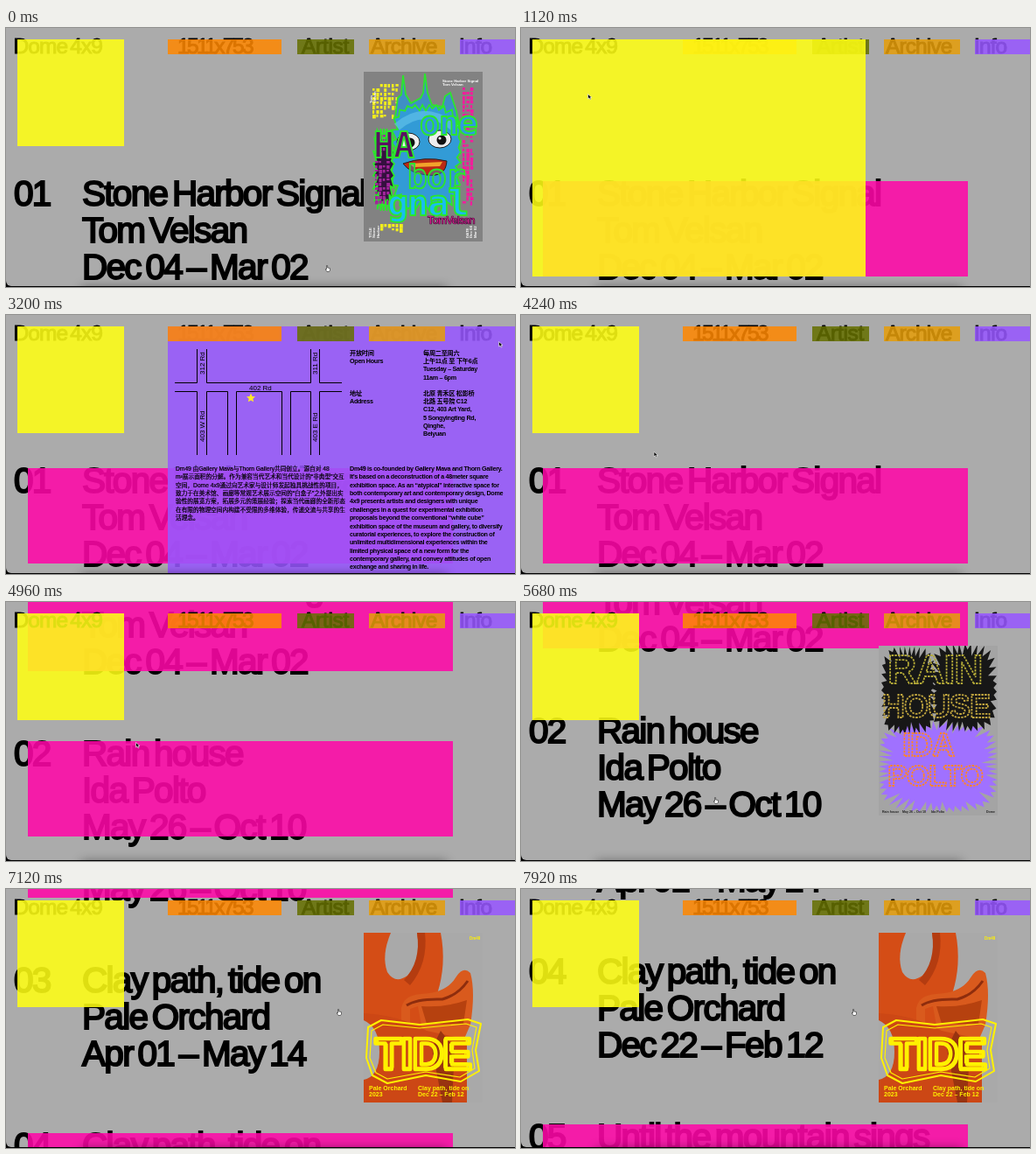
An HTML page that plays this animation: 582x296 px, repeating every 8 s.

```html
<!DOCTYPE html>
<html lang="en">
<head>
<meta charset="utf-8">
<title>Dome 4x9</title>
<style>
html, body { margin: 0; width: 100%; height: 100%; overflow: hidden; }
body { background: #ababab; color: #000; font-family: "Liberation Sans", Arial, sans-serif; }
#stage { position: relative; width: 582px; height: 296px; overflow: hidden; background: #ababab; }
#stage div, #stage svg { position: absolute; white-space: pre; }
#list { left: 0; top: 0; }
.row { left: 0; font-size: 40.5px; line-height: 42px; letter-spacing: -1.7px; word-spacing: -4px; -webkit-text-stroke: 2px #000; }
.pink { left: 25px; width: 486px; height: 109px; background: rgba(255,8,168,.87); }
.nav { top: 8.5px; font-size: 24.5px; line-height: 24px; letter-spacing: -.9px; word-spacing: -3px; -webkit-text-stroke: 1.1px #000; }
.tab { top: 13px; height: 17px; }
#room { left: 13px; top: 13px; background: rgba(255,255,20,.87); }
#info { right: 0; top: 13px; overflow: hidden; background: rgba(152,88,255,.87); }
#about { right: 0; top: 0; width: 397px; height: 283px; }
.copy { font: bold 7.2px/9.36px "Liberation Sans", Arial, "Noto Sans CJK SC", "Noto Sans CJK", sans-serif; letter-spacing: -.3px; }
.zh { font: 500 6.7px/9.36px "Liberation Sans", "Noto Sans CJK SC", "Noto Sans CJK", sans-serif; letter-spacing: 0; -webkit-text-stroke: .2px #000; }
.poster { left: 409px; top: 50px; overflow: hidden; }
#shade { left: 90px; top: 300px; width: 410px; height: 4px; box-shadow: 0 0 12px 4px rgba(0,0,0,.4); }
#edge { left: 0; top: -9px; width: 600px; height: 303.5px; border-radius: 0 0 0 6px; box-shadow: 0 0 0 9px #000; }
</style>
</head>
<body>
<div id="stage"></div>
<script>
const LOOP = 8000, PITCH = 189;
const stage = document.getElementById('stage');

const rows = [
  'Stone Harbor Signal\nTom Velsan\nDec 04 – Mar 02',
  'Rain house\nIda Polto\nMay 26 – Oct 10',
  'Clay path, tide on\nPale Orchard\nApr 01 – May 14',
  'Clay path, tide on\nPale Orchard\nDec 22 – Feb 12',
  'Until the mountain sings\nPale Orchard\nSep 10 – Nov 20'
];
const navs = [[8.5, 'Dome 4x9'], [196, '1511x753', -2.6], [338, 'Artist', -.3], [417, 'Archive'], [518, 'Info']];
const tabs = [[185, 130, 'rgba(255,136,0,.86)'], [333, 65, 'rgba(102,112,0,.86)'], [415, 87, 'rgba(230,158,10,.86)']];

// Motion: [time, values...]
const scrollKeys = [[4480, 0], [4960, 205], [5560, 205], [6180, 463], [7150, 463], [7760, 662]];
const mouseKeys = [[60, 367, 273], [620, 110, 115], [1120, 78, 77], [1300, 90, 90], [1640, 330, 288],
  [1840, 392, 240], [2240, 408, 22], [2420, 420, 24], [2760, 540, 22], [3200, 565, 32], [3480, 560, 40],
  [4000, 160, 150], [4400, 150, 162], [5120, 150, 162], [5500, 222, 225], [6280, 222, 225], [6640, 380, 139]];
// Hovered rows: [row, from, to, poster]
const hovers = [[0, -500, 200, 0], [0, 1660, 2000, 0], [1, 5100, 6200, 1], [2, 6460, 7780, 2], [3, 7780, 9000, 2]];

const clamp = v => Math.max(0, Math.min(1, v));
const ease = u => u * u * (3 - 2 * u);
const span = (t, a, b, d) => Math.min(clamp((t - a) / d), clamp(1 - (t - b) / d));

function at(keys, t) {
  const i = keys.findIndex(k => k[0] > t);
  if (i === 0) return keys[0].slice(1);
  if (i < 0) return keys[keys.length - 1].slice(1);
  const a = keys[i - 1], b = keys[i], u = ease((t - a[0]) / (b[0] - a[0]));
  return a.slice(1).map((v, n) => v + (b[n + 1] - v) * u);
}

let seed = 7;
const rnd = () => (seed = seed * 16807 % 2147483647) / 2147483647;

// Boxy blob with ragged spikes
function burst(cx, cy, rx, ry, n, depth) {
  const pts = [];
  for (let i = 0; i < n; i++) {
    const a = i / n * Math.PI * 2, c = Math.cos(a), s = Math.sin(a);
    const r = (i % 2 ? 1 : 1 - depth * (.4 + rnd())) / Math.pow(c ** 4 + s ** 4, .25);
    pts.push((cx + rx * c * r).toFixed(1) + ',' + (cy + ry * s * r).toFixed(1));
  }
  return pts.join(' ');
}

// Broken columns of small bars
function bars(x, y, cols, lines, color) {
  let out = '';
  for (let c = 0; c < cols; c++) for (let l = 0; l < lines; l++)
    if (rnd() > .2) out += `<rect x="${x + c * 4.4}" y="${y + l * 5}" width="${2 + rnd() * 2}" height="${2 + rnd() * 3}" fill="${color}"/>`;
  return out;
}

const tiny = (x, y, s, fill = '#fff', size = 4.6, more = '') =>
  s.split('\n').map((l, i) => `<text x="${x}" y="${y + i * size}" font-size="${size}" font-weight="bold" fill="${fill}" ${more}>${l}</text>`).join('');
const big = (x, y, s, size, attrs) =>
  `<text x="${x}" y="${y}" font-size="${size}" font-weight="bold" letter-spacing="-1" ${attrs}>${s}</text>`;
const eye = (x, y) => `<ellipse cx="${x}" cy="${y}" rx="13" ry="10" fill="#eee" stroke="#222"/>
  <circle cx="${x + 2}" cy="${y + 1}" r="5.5" fill="#111"/><circle cx="${x}" cy="${y - 1}" r="1.6" fill="#fff"/>`;

function harborArt() {
  const green = 'stroke="#2ce62c" stroke-width="1.8"';
  const block = 'font-family="DejaVu Sans Mono, monospace" ' + green;
  return `<rect width="136" height="194" fill="#828282"/>
    ${bars(10, 14, 7, 8, '#f2ee1c')}${bars(113, 18, 3, 27, '#f41c9c')}
    <polygon points="36,52 39,30 43,26 45,4 48,26 54,36 65,30 68,24 70,2 73,24 78,38 90,40 93,28 99,24 106,45 110,66" fill="#3f8fc4" ${green}/>
    <polygon points="${burst(71, 98, 40, 60, 64, .12)}" fill="#329bd6" ${green}/>
    <polygon points="${burst(23, 112, 12, 47, 44, .3)}" fill="#35103f" ${green}/>
    ${bars(13, 72, 4, 16, '#a3259c')}
    <path d="M38 63Q70 35 105 65" fill="none" stroke="#67c7ed" stroke-width="9" opacity=".6"/>
    ${eye(51, 80)}${eye(87, 77)}
    <path d="M45 105Q70 96 95 102Q94 121 72 118Q53 116 45 105Z" fill="#b92a16" stroke="#222"/>
    <path d="M52 105L90 103L87 108L57 109Z" fill="#f2a32b"/>
    ${big(64, 72, 'one', 38, 'fill="#2f9ade" ' + block)}
    ${big(11, 98, 'HA', 40, 'fill="#5b1262" ' + block)}
    ${big(50, 133, 'bor', 38, 'fill="#318fcb" fill-opacity=".45" ' + block)}
    ${big(27, 164, 'gnal', 40, 'fill="#19bdf0" ' + block)}
    ${big(73, 174, 'TomVelsan', 12, 'fill="#f41c9c" stroke="#43113a" stroke-width=".7"')}
    ${bars(19, 174, 6, 2, '#f2ee1c')}
    ${tiny(90, 12, 'Stone Harbor Signal\nTom Velsan', '#fff', 4.3)}
    ${tiny(9, 190, 'TITLE\nStone\nHarbor', '#fff', 4.3, 'transform="rotate(-90 9 190)"')}
    ${tiny(120, 190, 'DATE\nDec 04\nMar 02', '#fff', 4.3, 'transform="rotate(-90 120 190)"')}
    ${tiny(10, 36, 'Tom\nVelsan', '#fff', 4.3, 'transform="rotate(-90 10 36)"')}`;
}

function rainArt() {
  const line = c => `fill="none" stroke="${c}" stroke-width="1.8" stroke-dasharray="2.5 1.2"`;
  return `<rect width="136" height="194" fill="#a4a4a4"/>
    <polygon points="${burst(68, 138, 68, 52, 110, .2)}" fill="#a071ff"/>
    <polygon points="${burst(34, 51, 31, 50, 70, .2)}" fill="#171717"/>
    <polygon points="${burst(97, 48, 38, 50, 70, .2)}" fill="#171717"/>
    ${big(10, 43, 'RAIN', 46, line('#b3a937'))}${big(4, 82, 'HOUSE', 36, line('#c1a63f'))}
    ${big(27, 126, 'IDA', 36, line('#ff8527'))}${big(10, 160, 'POLTO', 34, line('#ff8527'))}
    ${tiny(4, 191, 'Rain house', '#222', 3.6)}${tiny(27, 191, 'May 26 – Oct 10', '#222', 3.6)}
    ${tiny(60, 191, 'Ida Polto', '#222', 3.6)}${tiny(123, 191, 'Dome', '#222', 3.6)}`;
}

function chairArt() {
  const line = w => `fill="none" stroke="#fff100" stroke-linejoin="round" stroke-width="${w}"`;
  return `<rect width="136" height="194" fill="#a9a9a9"/>
    <path d="M0 0H88Q95 36 84 70L76 130H0Z" fill="#d44d16"/>
    <path d="M31 0H61Q66 33 50 49Q36 59 27 45Q20 26 31 0Z" fill="#a9a9a9"/>
    <path d="M61 0H70Q74 35 53 60L46 54Q66 33 61 0Z" fill="#b43c10"/>
    <path d="M43 112V86Q46 71 66 70Q95 69 106 50Q114 38 122 46Q128 68 122 105L112 128H70L62 84 53 87V112Z" fill="#d95a1d"/>
    <path d="M49 83Q61 75 90 76Q108 71 119 55" fill="none" stroke="#8e2d0d" stroke-width="3"/>
    <path d="M66 84Q92 86 118 77L114 104H72Z" fill="#b6410f"/>
    <path d="M0 92Q40 94 72 112L118 122V194H0Z" fill="#cc4715"/>
    <path d="M0 100Q18 108 18 136T0 168Z" fill="#a9a9a9"/>
    <path d="M88 112L104 132L101 194H90L78 132Z" fill="#983310"/>
    <path d="M5 108L20 100 64 105 119 99 134 104 128 134 132 158 111 170 71 163 27 172 10 163 3 143Z" ${line(2)}/>
    <path d="M9 112L22 105 64 109 117 104 129 108 124 134 127 155 110 165 71 159 27 167 14 160 7 143Z" ${line(1.2)}/>
    ${big(13, 156, 'TIDE', 50, line(4.5))}${big(16, 154, 'TIDE', 47, line(1.5))}
    ${tiny(6, 180, 'Pale Orchard\n2023', '#fff100', 7)}
    ${tiny(62, 180, 'Clay path, tide on\nDec 22 – Feb 12', '#fff100', 7)}
    ${tiny(121, 8, 'Dm49', '#fff100', 4.5)}`;
}

const road = (x, y, s) => `<text x="${x}" y="${y}" font-size="8" transform="rotate(-90 ${x} ${y})">${s}</text>`;
const map = `<svg width="200" height="150" style="left:0;top:0"><g fill="none" stroke="#000" stroke-width="1">
  <path d="M8 64.500H33.500V26M44.500 26V64.500H163.500V26M173.500 26V64.500H199"/>
  <path d="M8 74.500H33.500V147M44.500 147V74.500H68.500V147M78.500 147V74.500H130.500V147M140.500 147V74.500H163.500V147M173.500 147V74.500H199"/></g>
  <polygon points="95,76.500 96.500,80 100,80.300 97.300,82.700 98.200,86.300 95,84.400 91.800,86.300 92.700,82.700 90,80.300 93.500,80" fill="#ffe928"/>
  <text x="93" y="73" font-size="8">402 Rd</text>${road(42, 55, '312 Rd')}${road(171, 55, '311 Rd')}
  ${road(42, 132, '403 W Rd')}${road(171, 132, '403 E Rd')}</svg>`;
const copy = (x, y, s, cls = '') => `<div class="copy ${cls}" style="left:${x}px;top:${y}px">${s}</div>`;
const about = map +
  copy(208, 25.5, '开放时间\nOpen Hours') +
  copy(292, 25.5, '每周二至周六\n上午11点 至 下午6点\nTuesday – Saturday\n11am – 6pm') +
  copy(208, 71.5, '地址\nAddress') +
  copy(292, 71.5, '北原 青禾区 松影桥\n北路 五号院 C12\nC12, 403 Art Yard,\n5 Songyingting Rd,\nQinghe,\nBeiyuan') +
  copy(9, 158, `Dm49 由Gallery Mava与Thorn Gallery共同创立。源自对 48
m²展示面积的分解。作为兼容当代艺术和当代设计的“非典型”交互
空间，Dome 4x9通过向艺术家与设计师发起独具挑战性的项目，
致力于在美术馆、画廊等常规艺术展示空间的“白盒子”之外提出实
验性的展览方案，拓展多元的策展经验；探索当代画廊的全新形态
在有限的物理空间内构建不受限的多维体验，传递交流与共享的生
活理念。`, 'zh') +
  copy(208, 158, `Dm49 is co-founded by Gallery Mava and Thorn Gallery.
It’s based on a deconstruction of a 48meter square
exhibition space. As an “atypical” interactive space for
both contemporary art and contemporary design, Dome
4x9 presents artists and designers with unique
challenges in a quest for experimental exhibition
proposals beyond the conventional “white cube”
exhibition space of the museum and gallery, to diversify
curatorial experiences, to explore the construction of
unlimited multidimensional experiences within the
limited physical space of a new form for the
contemporary gallery, and convey attitudes of open
exchange and sharing in life.`);

stage.innerHTML =
  '<div id="list">' +
  rows.map((s, i) => `<div class="row" style="top:${167.5 + i * PITCH}px"><div style="left:9px">0${i + 1}</div><div style="left:87px">${s}</div></div>`).join('') +
  rows.map((s, i) => `<div class="pink" style="top:${175 + i * PITCH}px"></div>`).join('') + '</div>' +
  navs.map(([x, s, ls]) => `<div class="nav" style="left:${x}px;${ls ? `letter-spacing:${ls}px` : ''}">${s}</div>`).join('') +
  `<div id="info"><div id="about">${about}</div></div>` +
  tabs.map(([x, w, c]) => `<div class="tab" style="left:${x}px;width:${w}px;background:${c}"></div>`).join('') +
  '<div id="room"></div>' +
  [harborArt, rainArt, chairArt].map(f => `<svg class="poster" width="136" height="194">${f()}</svg>`).join('') +
  `<div id="shade"></div><div id="edge"></div>
  <svg id="mouse" width="10" height="10" style="left:0;top:0" stroke="#fff" stroke-width=".6">
    <path d="M.5 .5V6L2 4.800L3 7L4 6.500L3.200 4.500H5Z" fill="#000"/>
    <path d="M1.500 .5L2.600 .5V3L5.500 3.600V6L4.500 7.500H2L0 4.500L1.500 4.800Z" fill="#fff" stroke="#222"/></svg>`;

const $ = id => document.getElementById(id);
const list = $('list'), room = $('room'), info = $('info'), panel = $('about'), mouse = $('mouse');
const pinks = document.querySelectorAll('.pink'), posters = document.querySelectorAll('.poster');
const [arrow, hand] = mouse.children;

function draw(now) {
  const t = now % LOOP;
  list.style.top = -at(scrollKeys, t)[0] + 'px';

  const hit = hovers.find(([, a, b]) => t >= a && t < b);
  pinks.forEach((p, i) => p.style.visibility = hit && hit[0] === i ? 'hidden' : 'visible');
  posters.forEach((p, i) => p.style.opacity =
    Math.min(1, hovers.reduce((sum, [, a, b, art]) => sum + (art === i ? span(t, a, b, 150) : 0), 0)));

  const r = ease(span(t, 640, 1640, 360));
  room.style.width = 122 + 259 * r + 'px';
  room.style.height = 122 + 149 * r + 'px';

  const o = ease(span(t, 2780, 3720, 360));
  info.style.width = 63 + 334 * o + 'px';
  info.style.height = 17 + 266 * o + 'px';
  panel.style.visibility = o > 0 ? 'visible' : 'hidden';

  const [x, y] = at(mouseKeys, t);
  mouse.style.transform = `translate(${x - 2}px,${y - 2}px)`;
  arrow.style.display = hit ? 'none' : '';
  hand.style.display = hit ? '' : 'none';
}

const start = performance.now();
function frame() {
  draw(performance.now() - start);
  requestAnimationFrame(frame);
}
frame();
</script>
</body>
</html>
```
